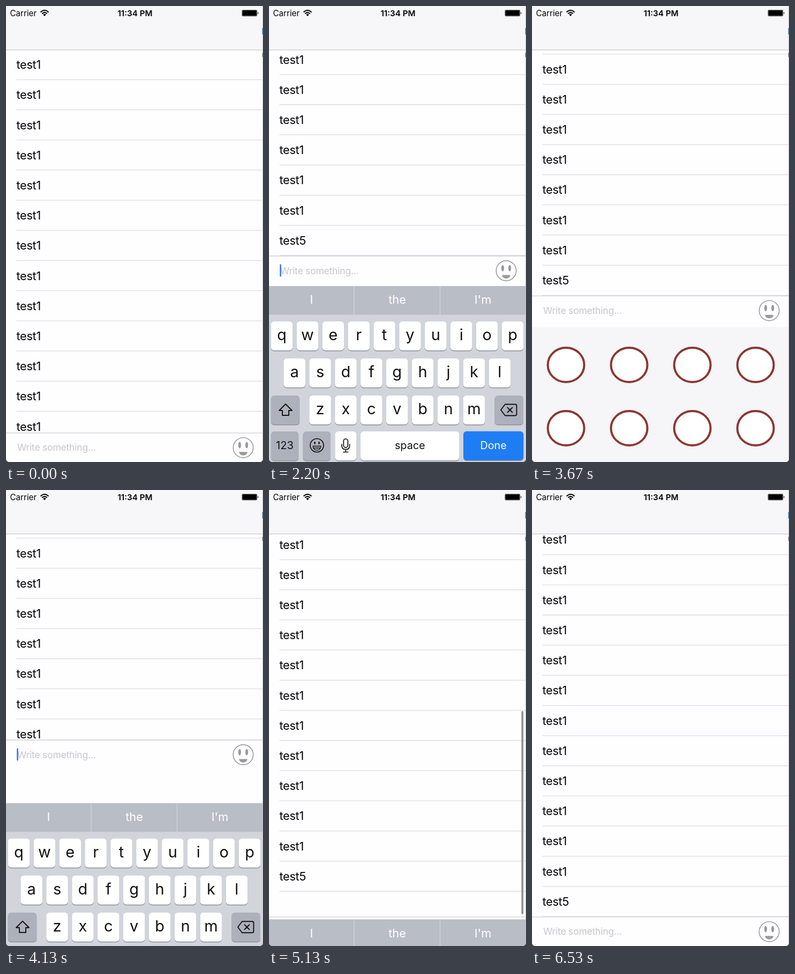
Recreate the animation shown at these times as an HTML page. Size 480x850 px, loop 6.87 s.

```html
<!DOCTYPE html>
<html lang="en">
<head>
<meta charset="utf-8">
<title>Chat input with keyboard and sticker panel</title>
<style>
  html, body { margin: 0; width: 100%; height: 100%; overflow: hidden; background: #fefdff; }
  svg { display: block; width: 480px; height: 850px; font-family: Inter, sans-serif; }
  text { white-space: pre; }
  .mid { text-anchor: middle; }
  .row text { font-size: 21.6px; letter-spacing: -.25px; }
  .line { fill: none; stroke-width: 1.3; stroke: #dddce1; }
  .icon { fill: none; stroke: #111; stroke-width: 1.9; stroke-linejoin: round; stroke-linecap: round; }
</style>
</head>
<body>
<svg viewBox="0 0 480 850">
  <rect width="480" height="850" fill="#fefdff"/>
  <g id="list"></g>
  <rect id="thumb" x="471.5" y="412" width="3.6" height="379" rx="1.8" fill="#8f8f92"/>

  <g id="bar">
    <rect width="480" height="400" fill="#fefdff"/>
    <path class="line" d="M0 0H480" style="stroke:#cfced3"/>
    <text x="21" y="33.5" font-size="17.5" letter-spacing="-.2" fill="#c7c7cc">Write something...</text>
    <rect id="caret" x="20.3" y="15.5" width="2.4" height="23" rx="1" fill="#2d6ee0"/>
    <g fill="#98999d">
      <circle cx="443" cy="27.5" r="18.7" fill="none" stroke="#8f9094" stroke-width="1.4"/>
      <ellipse cx="436.4" cy="22.8" rx="2.6" ry="6"/>
      <ellipse cx="449.6" cy="22.8" rx="2.6" ry="6"/>
      <path d="M435 35.5H451Q449.5 42 443 42T435 35.5Z"/>
    </g>
  </g>

  <g id="panel"><rect width="480" height="254" fill="#f6f5f7"/></g>

  <g id="keyboard">
    <rect width="480" height="328" fill="#d1d4db"/>
    <rect width="480" height="53.5" fill="#b9bdc6"/>
    <path d="M159 0V53.5M319.5 0V53.5" stroke="#d3d6dc" stroke-width="1.2"/>
  </g>

  <rect width="480" height="81.5" fill="#f7f6f9"/>
  <path class="line" d="M0 81.8H480" style="stroke:#c9c8cc"/>
  <text x="7.5" y="18.6" font-size="15.2">Carrier</text>
  <text class="mid" x="241" y="18.6" font-size="15.2" font-weight="600">11:34 PM</text>
  <g fill="none" stroke="#000" stroke-width="2.1">
    <path d="M64.5 11.5Q72 4.5 79.5 11.5M67.2 14.3Q72 9.8 76.8 14.3"/>
    <path d="M69.2 16Q72 13.6 74.8 16L72 19Z" fill="#000" stroke="none"/>
  </g>
  <rect x="440.3" y="7" width="29" height="12.4" rx="2.4" fill="#777"/>
  <rect x="441.6" y="8.3" width="26.4" height="9.8" rx="1" fill="#000"/>
  <path d="M470.2 11Q472.6 13.2 470.2 15.5Z"/>

  <path d="M479.5 0V850" stroke="#c9c9ce"/>
  <path d="M479.3 41V53" stroke="#2f78b0" stroke-width="1.4"/>
  <path d="M479.5 87V95" stroke="#444"/>
  <path d="M0 845Q1 849 5 850H0ZM480 845Q479 849 475 850H480Z" fill="#444"/>
</svg>
<script>
const $ = id => document.getElementById(id);
const add = (id, markup) => $(id).insertAdjacentHTML('beforeend', markup);

const ROWS = 24, PITCH = 56.2, FIRST = 137.3;
const LOOP = 6870, FPS = 15;
const KEYS_H = 328, PANEL_H = 252;

for (let i = 0; i < ROWS; i++) {
  const y = FIRST + i * PITCH;
  add('list', `<g class="row"><text x="19.5" y="${y - 20.2}">test${i == ROWS - 1 ? 5 : 1}</text>
    <path class="line" d="M19.5 ${y}H480"/></g>`);
}

// Stickers: plain ovals
for (let i = 0; i < 8; i++) {
  const x = 63.5 + i % 4 * 118, y = i < 4 ? 71 : 189;
  add('panel', `<ellipse cx="${x}" cy="${y}" rx="34" ry="32" fill="#fff" stroke="#8b3730" stroke-width="4"/>`);
}

function key(x, y, w, label = '', size = 29, fill = '#fff', ink = '#111') {
  add('keyboard', `<rect x="${x}" y="${y + 1.4}" width="${w}" height="54" rx="6" fill="#8d9097"/>
    <rect x="${x}" y="${y}" width="${w}" height="54" rx="6" fill="${fill}"/>
    <text class="mid" x="${x + w / 2}" y="${y + (size > 25 ? 35 : 33.2)}" font-size="${size}" fill="${ink}">${label}</text>`);
}
const GREY = '#acb1bc';
[['qwertyuiop', 3.7, 66], ['asdfghjkl', 27.4, 135], ['zxcvbnm', 75.3, 204]].forEach(([letters, x, y]) =>
  [...letters].forEach((c, i) => key(x + i * 47.9, y, 40.5, c)));
key(3.7, 204, 53.5, '', 29, GREY);
key(421.5, 204, 53.5, '', 29, GREY);
key(3.7, 271, 51.5, '123', 20, GREY);
key(63.5, 271, 51.5, '', 20, GREY);
key(123.3, 271, 40, '');
key(171, 271, 184.5, 'space', 19.8);
key(363, 270.7, 112.3, 'Done', 19.8, '#1f7df4', '#fff');
['I', 'the', "I'm"].forEach((word, i) =>
  add('keyboard', `<text class="mid" x="${79.5 + i * 160}" y="33" font-size="21.8" fill="#fff">${word}</text>`));
add('keyboard', `<g class="icon">
  <path d="M31 220L43 232H37V241H25V232H19Z"/>
  <path d="M441 220.5H460Q462.5 220.5 462.5 223V239Q462.5 241.5 460 241.5H441L433 231ZM445.5 226.5L454.5 235.5M454.5 226.5L445.5 235.5"/>
  <circle cx="89.5" cy="297" r="12.5" stroke-width="1.7"/>
  <path d="M82 298.5H97Q96 306 89.5 306T82 298.5ZM83.5 302H95.5" stroke-width="1.3"/>
  <path d="M85.5 291.5V293.5M93.5 291.5V293.5" stroke-width="2.6"/>
  <rect x="139.3" y="285" width="8" height="16" rx="4" stroke-width="1.7"/>
  <path d="M136 295V298Q136 304.5 143.3 304.5T150.6 298V295M143.3 304.5V309.5M139 309.5H147.6" stroke-width="1.7"/>
</g>`);

// Start times: keyboard in, stickers in, keyboard back, all hidden
const OPEN = 1740, STICKERS = 2727, BACK = 3965, CLOSE = 4949;
const LIST_BACK = 4200, LIST_CLOSE = 4945;
const TOP = 0, AT_KEYS = 964.9, AT_PANEL = 890.6, AT_END = 634.9;

// Critically damped spring
function spring(ms) {
  if (ms <= 0) return 0;
  if (ms > 450) return 1;
  const x = ms * .01826;
  return 1 - (1 + x) * Math.exp(-x);
}
const mix = (a, b, p) => a + (b - a) * p;
const move = (id, y) => $(id).setAttribute('transform', `translate(0 ${y.toFixed(2)})`);

function draw(t) {
  const since = start => spring(t - start);
  const up = 850 - KEYS_H;
  let keys, bar, scroll;
  if (t < STICKERS) {
    keys = mix(850, up, since(OPEN));
    bar = t < OPEN ? 795.8 : 466;
    scroll = mix(TOP, AT_KEYS, since(OPEN));
  } else if (t < BACK) {
    keys = mix(up, 850, since(STICKERS));
    bar = 540.3;
    scroll = AT_PANEL;
  } else if (t < CLOSE) {
    keys = mix(850, up, since(BACK));
    bar = 466;
    scroll = mix(AT_PANEL, AT_KEYS, since(LIST_BACK));
  } else {
    keys = mix(up, 850, since(CLOSE));
    bar = 795.8;
    scroll = mix(AT_KEYS, AT_END, since(LIST_CLOSE));
  }
  move('list', -scroll);
  move('bar', bar);
  move('keyboard', keys);
  move('panel', t >= STICKERS && t < BACK ? mix(850, 850 - PANEL_H, since(STICKERS)) : 850);
  $('caret').setAttribute('opacity', bar == 466 ? 1 : 0);
  $('thumb').setAttribute('opacity', t < CLOSE ? 0 : Math.max(0, Math.min(1, (5870 - t) / 270)));
}

const start = performance.now();
function tick() {
  const t = (performance.now() - start) % LOOP;
  draw(Math.floor((t + 5) * FPS / 1000) * 1000 / FPS);
  requestAnimationFrame(tick);
}
tick();
</script>
</body>
</html>
```
